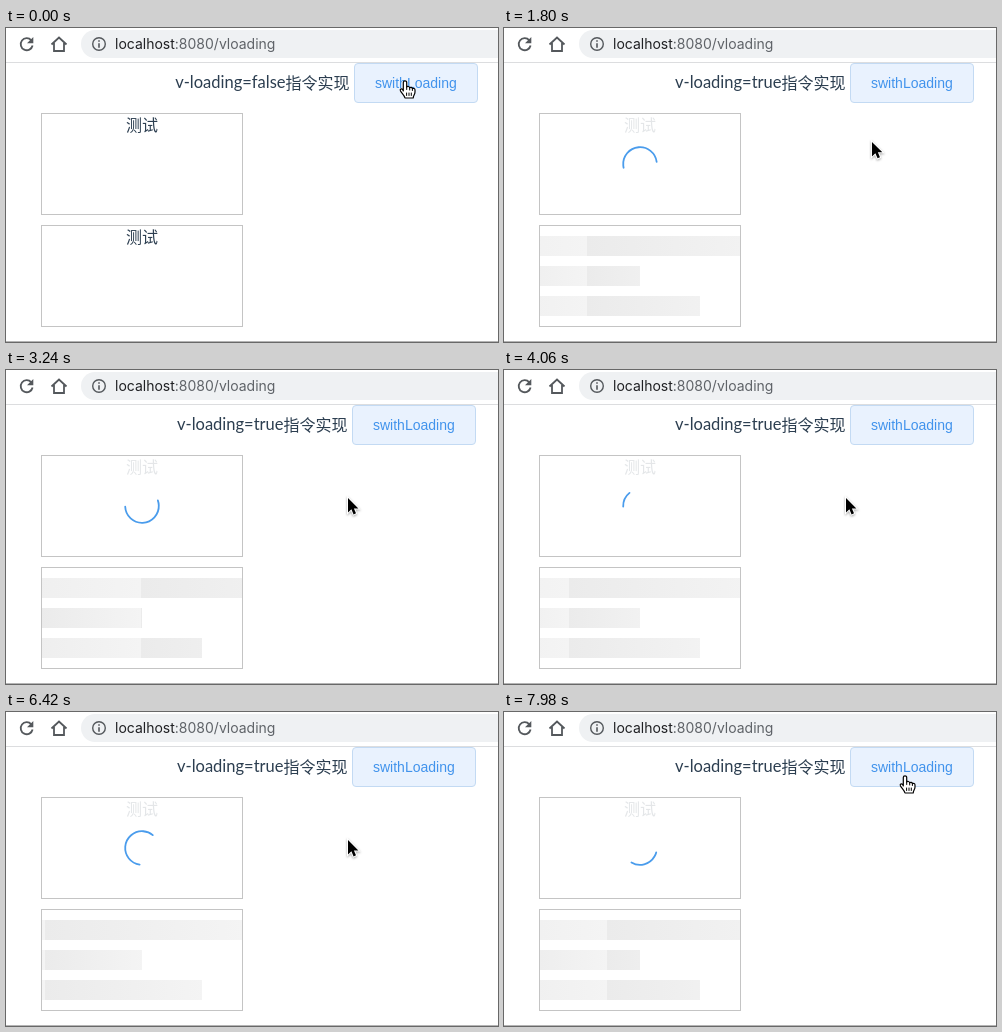
Animation of 492x314 px, one loop 8 s. Source, as an HTML page:

```html
<!DOCTYPE html>
<html lang="zh">
<head>
<meta charset="utf-8">
<title>v-loading</title>
<style>
  html, body { margin: 0; width: 100%; height: 100%; overflow: hidden; background: #fff; }
  svg { display: block; }
  .cjk { font: 16px "Noto Sans CJK SC", "Noto Sans CJK", sans-serif; fill: #2c3e50; }
  .latin { font: 16.5px Lato, sans-serif; fill: #2c3e50; text-anchor: end; }
  .url { font: 14px Inter, sans-serif; fill: #5f6368; }
  .button { font: 14px "Liberation Sans", Arial, sans-serif; fill: #4193ec; }
  .box { fill: none; stroke: #c4c4c4; }
  .icon { fill: none; stroke: #54585c; stroke-width: 1.8; }
  .mid { text-anchor: middle; }
</style>
</head>
<body>
<svg width="492" height="314" viewBox="0 0 492 314">
  <defs id="defs"></defs>

  <!-- browser bar -->
  <rect x="75" y="2" width="440" height="28" rx="14" fill="#eff1f3"/>
  <path d="M0 34.5H492" stroke="#dcdddf"/>
  <path class="icon" d="M25.3 12.3A6 6 0 1 0 26.6 17.5"/>
  <path d="M27.3 9V15.3H21Z" fill="#54585c"/>
  <path class="icon" d="M45.5 16.5L53 9.5 60.5 16.5M48 15V23H58V15"/>
  <circle class="icon" cx="93" cy="16" r="6.3" style="stroke-width:1.4"/>
  <path d="M93 12.2V13.8M93 15.2V19.8" stroke="#54585c" stroke-width="1.6"/>
  <text class="url" x="109" y="21"><tspan fill="#202124">localhost</tspan>:8080/vloading</text>

  <!-- heading and button -->
  <g id="heading">
    <text id="flag" class="latin" x="279.5" y="60"></text>
    <text class="cjk" x="279.5" y="61">指令实现</text>
    <rect x="348.5" y="35.5" width="123" height="39" rx="3.5" fill="#e9f2fe" stroke="#c3daf3"/>
    <text class="button" x="369" y="60">swithLoading</text>
  </g>

  <!-- spinner box -->
  <rect class="box" x="35.5" y="85.5" width="201" height="101"/>
  <text class="cjk mid" x="136" y="103">测试</text>
  <g id="mask">
    <rect x="36" y="86" width="200" height="100" fill="#fff" opacity=".87"/>
    <circle id="arc" cx="136" cy="136" r="16.8" fill="none" stroke="#4a9cec" stroke-width="1.8" stroke-linecap="round"/>
  </g>

  <!-- skeleton box -->
  <rect class="box" x="35.5" y="197.5" width="201" height="101"/>
  <text id="content" class="cjk mid" x="136" y="215">测试</text>
  <g id="skeleton"></g>

  <path d="M0 313.5H492" stroke="#b4b4b4"/>

  <g id="hand" stroke="#000" stroke-width="1.2" stroke-linejoin="round" stroke-linecap="round">
    <path fill="#fff" d="M-1.7 10V1.5C-1.7-.7 1.7-.7 1.7 1.5V6C2.5 5 4.5 5.3 4.7 6.8 5.5 6 7.2 6.4 7.4 7.6 8.6 7 10 7.6 10 9V11C10 13.5 8.5 14 8.2 17H0C-.5 14.5-3 12.5-4.5 10-5.5 8-3.5 7.2-2.3 8.6Z"/>
    <path fill="none" d="M1.7 6V8.5M4.7 6.8V9M7.4 7.6V9.5M1.6 12V14.5M4 12V14.5M6.3 12V14.5" stroke-width="1"/>
  </g>
  <path id="arrow" d="M0 0V14.5L3.4 11.3 5.6 16.4 8 15.3 5.9 10.4H10.4Z" stroke="#fff" stroke-width="2"
        paint-order="stroke" style="filter:drop-shadow(0 1px 1px rgba(0,0,0,.35))"/>
</svg>
<script>
const LOOP = 8000, SWITCH = 440, BUTTON_BOTTOM = 75;
const $ = id => document.getElementById(id);

// [time in ms, seconds the page has been loading]
const CLOCK = [[440, 0], [1240, .275], [2500, .715], [4060, 1.285], [6040, 1.99],
               [6420, 2.025], [7300, 2.395], [7400, 2.41], [7980, 2.67]];
// [time in ms, x, y]
const POINTER = [[1300, 399, 53], [1500, 408, 64], [1700, 390, 102], [1920, 342, 128],
                 [6600, 342, 128], [7160, 374, 106], [7300, 378, 98], [7640, 394, 77], [7960, 401, 64]];

const mix = (a, b, k) => a + (b - a) * k;
const clamp = k => Math.min(1, Math.max(0, k));

function along(keys, t, column = 1) {
  let i = 1;
  while (i < keys.length - 1 && keys[i][0] < t) i++;
  const [a, b] = [keys[i - 1], keys[i]];
  return mix(a[column], b[column], clamp((t - a[0]) / (b[0] - a[0])));
}

function bezier(x1, y1, x2, y2) {
  const curve = (a, b, s) => 3 * a * s * (1 - s) ** 2 + 3 * b * s * s * (1 - s) + s ** 3;
  return x => {
    let low = 0, high = 1;
    for (let i = 0; i < 20; i++) {
      const s = (low + high) / 2;
      if (curve(x1, x2, s) < x) low = s; else high = s;
    }
    return curve(y1, y2, low);
  };
}
const ease = bezier(.25, .1, .25, 1);
const easeInOut = bezier(.42, 0, .58, 1);

const bars = [[208, 200], [238, 100], [268, 160]].map(([y, width], i) => {
  $('defs').innerHTML += `<linearGradient id="shade${i}" gradientUnits="userSpaceOnUse" spreadMethod="repeat">
    <stop stop-color="#ebebeb"/><stop offset="1" stop-color="#f4f4f4"/></linearGradient>`;
  $('skeleton').innerHTML += `<rect x="36" y="${y}" width="${width}" height="20" fill="url(#shade${i})"/>`;
  return width;
});

function drawSpinner(sec) {
  const unit = 16.8 / 20;
  const phase = sec / 1.5 % 1 * 2;
  const k = easeInOut(phase % 1);
  const [length, start] = phase < 1 ? [mix(1, 90, k), 40 * k] : [90, mix(40, 120, k)];
  $('arc').setAttribute('stroke-dasharray', `${length * unit} ${150 * unit}`);
  $('arc').setAttribute('stroke-dashoffset', -start * unit);
  $('arc').setAttribute('transform', `rotate(${sec * 180} 136 136)`);
  $('mask').setAttribute('opacity', ease(clamp(sec / .3)));
}

function drawSkeleton(sec) {
  const edge = 36 + sec % 1 * 100;
  bars.forEach((width, i) => {
    $('shade' + i).setAttribute('x1', edge);
    $('shade' + i).setAttribute('x2', edge + width);
  });
}

function drawPointer(t) {
  const x = along(POINTER, t), y = along(POINTER, t, 2);
  const onButton = y < BUTTON_BOTTOM;
  for (const id of ['hand', 'arrow']) {
    $(id).setAttribute('transform', `translate(${x} ${y})`);
    $(id).setAttribute('visibility', (id === 'hand') === onButton ? 'visible' : 'hidden');
  }
}

function draw(t) {
  const loading = t >= SWITCH;
  const sec = along(CLOCK, t);
  $('flag').textContent = `v-loading=${loading}`;
  $('heading').setAttribute('transform', `translate(${loading ? -2 : 0} 0)`);
  $('content').setAttribute('visibility', loading ? 'hidden' : 'visible');
  $('skeleton').setAttribute('visibility', loading ? 'visible' : 'hidden');
  drawSpinner(sec);
  drawSkeleton(sec);
  drawPointer(t);
}

const begin = performance.now();
function tick() {
  draw((performance.now() - begin) % LOOP);
  requestAnimationFrame(tick);
}
tick();
</script>
</body>
</html>
```
